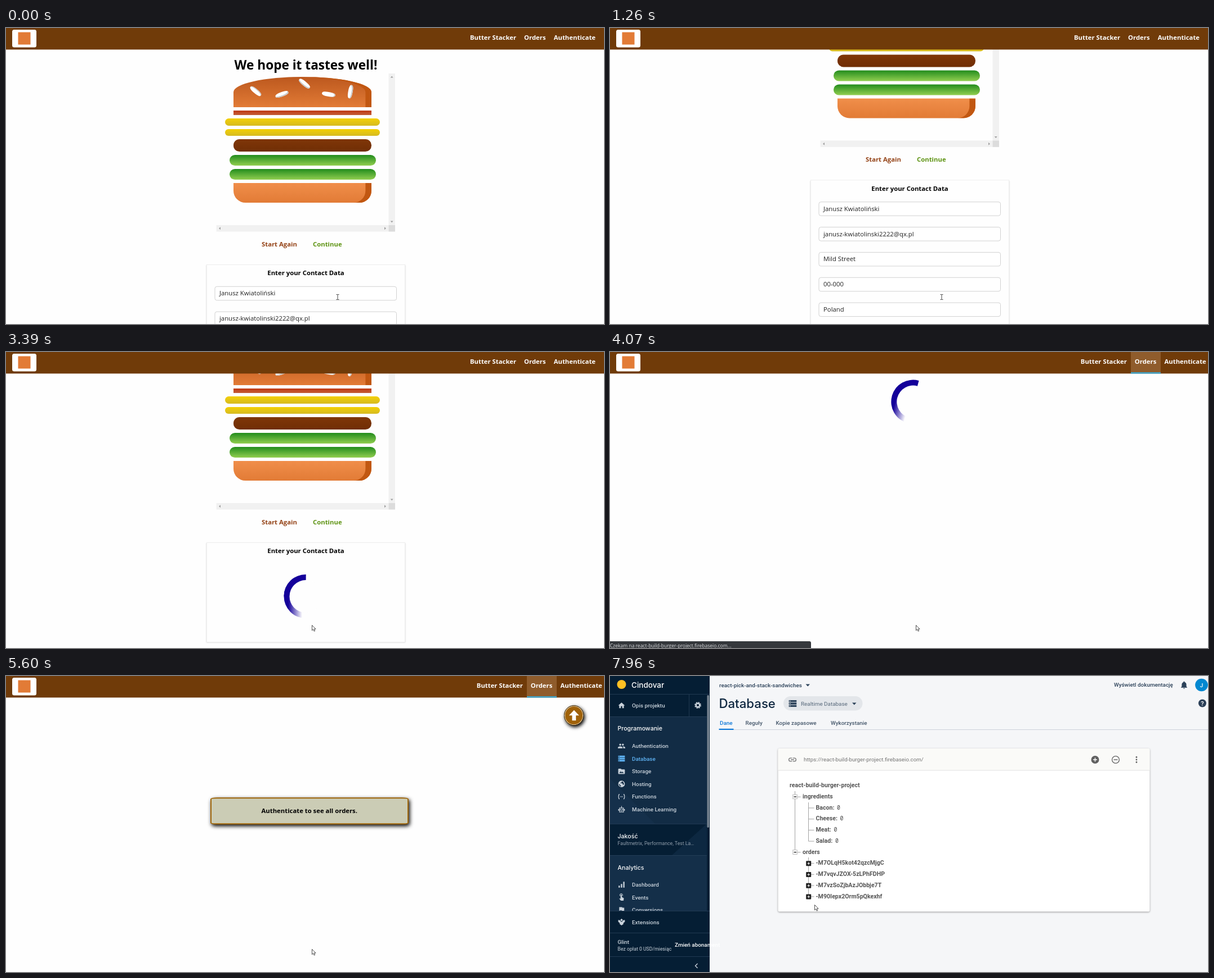
An HTML page for the animation above (7.99 s loop, 1062 by 527 pixels).

```html
<!DOCTYPE html>
<html lang="en">
<head>
<meta charset="utf-8">
<title>Order flow</title>
<style>
html, body { margin: 0; width: 100%; height: 100%; overflow: hidden; background: #fefefe; }
#stage { position: relative; width: 100%; height: 100%; overflow: hidden; contain: strict; }
#stage * { position: absolute; box-sizing: border-box; }
svg { left: 0; top: 0; overflow: visible; }
#app, #page { left: 0; top: 0; width: 100%; height: 100%; }
#app text, #app { font: 11.32px "Open Sans", sans-serif; }
#app .b { font-weight: 700; }
#db text { font-family: Roboto, sans-serif; font-weight: 500; font-size: 9.9px; }
#db .g { font-family: Inter, sans-serif; }
#burger { left: 373.6px; top: 81px; width: 306px; height: 270px; }
#burger > div { position: relative; margin: 6.12px auto; }
#burger .top { border-radius: 50% 50% 0 0; }
#burger .top, #burger .bottom { box-shadow: inset -10.6px 0 #c15711; }
#burger .bottom { border-radius: 0 0 21.2px 21.2px; }
.seed, .seed::before, .seed::after { background: #fff; border-radius: 40%; position: absolute; }
.seed { width: 10%; height: 15%; top: 50%; }
.seed::before, .seed::after { content: ""; width: 100%; height: 100%; }
.s1 { left: 30%; transform: rotate(-20deg); box-shadow: inset -1.4px -2.1px #c9c9c9; }
.s1::after { left: -170%; top: -260%; transform: rotate(60deg); box-shadow: inset -.7px 1.4px #c9c9c9; }
.s1::before { left: 180%; top: -50%; transform: rotate(60deg); box-shadow: inset -.7px -2.1px #c9c9c9; }
.s2 { left: 64%; transform: rotate(10deg); box-shadow: inset -2.1px 0 #c9c9c9; }
.s2::before { left: 150%; top: -130%; transform: rotate(90deg); box-shadow: inset .7px 2.1px #c9c9c9; }
.s2::after { display: none; }
#card { left: 356px; top: 421px; width: 353px; border: .7px solid #eee; box-shadow: 0 1.4px 2.1px #ccc; }
#spin { width: 77.8px; height: 77.8px; margin: -38.9px; border-radius: 50%;
  background: linear-gradient(to right, #14009a 10%, #14009a00 42%); }
#spin::before { content: ""; position: absolute; width: 50%; height: 50%; border-radius: 100% 0 0; background: #14009a; }
#spin::after { content: ""; position: absolute; inset: 12.5%; border-radius: 50%; background: #fefefe; }
#msg { left: 362.5px; top: 0; width: 352.5px; height: 48px; border: 2.6px solid #a0660a; border-radius: 12px 12px 8px 8px / 3px;
  background: #cbccb5; box-shadow: 2px 3px 7px #000; text-align: center; line-height: 43px; font-weight: 700; }
#up { left: 990.5px; top: 0; width: 35.5px; height: 35.5px; border: 1px solid #3a2400; border-radius: 50%;
  background: #a0620a; box-shadow: inset 0 0 0 1px #f3e6cf, 2px 3px 6px #000; }
#status { left: 0; top: 514.5px; width: 356.5px; height: 13px; background: #35383c; border-radius: 0 3px 0 0;
  color: #dcdde0; font-size: 8.5px; line-height: 15px; white-space: nowrap; }
</style>
</head>
<body>
<div id="stage">
  <div id="app">
    <div id="page">
      <div id="burger"></div>
      <div id="card"></div>
      <svg id="form" width="1062" height="527"></svg>
    </div>
    <div id="spin"></div>
    <div id="msg">Authenticate to see all orders.</div>
    <div id="up"><svg width="34" height="34"><path d="M16.8 7.5l9 9.5h-5.6v9h-6.8v-9H7.8z" fill="#fff"/></svg></div>
    <svg id="nav" width="1062" height="40"></svg>
    <div id="status">Czekam na react-build-burger-project.firebaseio.com...</div>
  </div>
  <svg id="db" width="1062" height="527"></svg>
  <svg id="cursor" width="20" height="20">
    <path id="beam" d="M-2.5-4.5h2l.5.5.5-.5h2M0-4v8M-2.5 4.5h2L0 4l.5.5h2" fill="none" stroke="#333" stroke-width=".9"/>
    <path id="arrow" d="M.5.5v9.3l2.1-2 1.6 3.4 1.5-.7-1.5-3.3h2.9z" fill="#fff" stroke="#222" stroke-width=".8"/>
    <path id="hand" d="M-1 7V1q1-1.3 2 0v3.5l4.5 1q1 .4 1 1.5L6 10l-1 2.5h-5L-3.7 7.5q0-1.5 1.3-1z" fill="#fff" stroke="#222" stroke-width=".8"/>
  </svg>
</div>
<script>
const LOOP = 7990, $ = id => document.getElementById(id);
const text = (x, y, s, fill = '#000', attr = '') => `<text x="${x}" y="${y}" fill="${fill}" ${attr}>${s}</text>`;
const rect = (x, y, w, h, fill, attr = '') => `<rect x="${x}" y="${y}" width="${w}" height="${h}" fill="${fill}" ${attr}/>`;
const path = (d, fill, attr = '') => `<path d="${d}" fill="${fill}" ${attr}/>`;
const line = (d, color, w = 1) => path(d, 'none', `stroke="${color}" stroke-width="${w}"`);
const disc = (x, y, r, fill, attr = '') => `<circle cx="${x}" cy="${y}" r="${r}" fill="${fill}" ${attr}/>`;
const icon = (x, y, d, fill, s = .59) => path(d, fill, `fill-rule="evenodd" transform="translate(${x} ${y}) scale(${s}) translate(-12 -12)"`);
const BOLD = 'class="b"', MID = 'text-anchor="middle"';

// Burger: class, width %, height, radius, gradient
$('burger').innerHTML = [
  ['top', 80, 54, '', '#bc581e,#e27b36'],
  ['', 80, 8.1, 0, '#bf3813,#c45e38'],
  ['', 90, 12.15, 14, '#f4d004,#d6bb22'],
  ['', 90, 12.15, 14, '#f4d004,#d6bb22'],
  ['', 80, 21.6, 10.6, '#7f3608,#702e05'],
  ['', 85, 18.9, 14, '#228c1d,#91ce50'],
  ['', 85, 18.9, 14, '#228c1d,#91ce50'],
  ['bottom', 80, 35.1, '', '#f08e4a,#e27b36']
].map(([c, w, h, r, g]) => `<div class="${c}" style="width:${w}%;height:${h}px;background:linear-gradient(${g});${r === '' ? '' : `border-radius:${r}px`}">${
  c === 'top' ? '<div class="seed s1"></div><div class="seed s2"></div>' : ''}</div>`).join('');

const fields = ['Janusz Kwiatoliński', 'janusz-kwiatolinski2222@qx.pl', 'Mild Street', '00-000', 'Poland'];
const box = (y, h) => rect(371, y, 322.5, h, '#fff', 'rx="3.5" stroke="#ccc" stroke-width=".9"');
$('form').innerHTML =
  text(532.5, 74, 'We hope it tastes well!', '#000', `${BOLD} ${MID} style="font-size:22.64px"`) +
  rect(679.5, 81, 11.5, 270, '#f1f1f1') + rect(373.6, 351, 306, 11.5, '#f1f1f1') + rect(679.5, 351, 11.5, 11.5, '#dcdcdc') +
  path('M682.7 88.5h5l-2.5-3zM682.7 343.5h5l-2.5 3zM381 354.3v5l-3-2.5zM672 354.3v5l3-2.5z', '#a0a0a0') +
  text(454, 388.6, 'Start Again', '#944317', BOLD) + text(545, 388.6, 'Continue', '#5c9210', BOLD) +
  text(532.5, 440.2, 'Enter your Contact Data', '#000', `${BOLD} ${MID}`) +
  '<g id="fields">' + fields.map((s, i) => box(460.3 + i * 44.85, 24.5) + text(379, 476.3 + i * 44.85, s, '#222')).join('') +
  box(684.3, 26) + text(382, 701.6, 'Fastest', '#222') + line('M684.5 696.2l2.7 2.8 2.7-2.8', '#222', 1.4) +
  text(525.5, 743, 'ORDER', '#5c9210', `${BOLD} ${MID}`) + '</g>';

$('nav').innerHTML = rect(0, 0, 1062, 38.4, '#703b09') + rect(11, 3, 43, 31.5, '#fff', 'rx="3.5"') +
  rect(21.5, 7.5, 22, 22, '#e27b36') +
  '<g id="active">' + rect(925, 0, 53, 36, '#8f5c2c') + rect(925, 36, 53, 2.6, '#40a4c8') + '</g><g id="links">' +
  text(824, 21.3, 'Butter Stacker', '#fff', BOLD) + text(920, 21.3, 'Orders', '#fff', BOLD) +
  text(972.7, 21.3, 'Authenticate', '#fff', BOLD) + '</g>';

const ICONS = {
  home: 'M10 20v-6h4v6h5v-8h3L12 3 2 12h3v8z',
  people: 'M16 11a3 3 0 1 0 0-6 3 3 0 0 0 0 6zM8 11a3 3 0 1 0 0-6 3 3 0 0 0 0 6zM8 13c-2.3 0-7 1.2-7 3.5V19h14v-2.5C15 14.2 10.3 13 8 13zm8 0h-1c1.2.9 2 2 2 3.5V19h6v-2.5c0-2.3-4.7-3.5-7-3.5z',
  data: 'M2 21h20v-5H2zM2 3v5h20V3zM2 14.5h20v-5H2zM4 4.5h2v2H4zM4 11h2v2H4zM4 17.5h2v2H4z',
  folder: 'M10 4H4a2 2 0 0 0-2 2v12a2 2 0 0 0 2 2h16a2 2 0 0 0 2-2V8a2 2 0 0 0-2-2h-8zM5 17l4-5 3 3 2-2 5 4z',
  globe: 'M12 2a10 10 0 1 0 0 20 10 10 0 0 0 0-20zM4 11l6 6v3q-6-2-6-9zM13 4q7 2 6 11l-4-2v-3H9V8h3z',
  code: 'M6 4H5Q2 5 2 12t3 8h1v-2q-2-1-2-6t2-6zM18 4h1q3 1 3 8t-3 8h-1v-2q2-1 2-6t-2-6zM8 11h2v2H8zM11 11h2v2h-2zM14 11h2v2h-2z',
  robot: 'M11 2h2v5h6v4h3v5h-3v5H5v-5H2v-5h3V7h6zM7 9v10h10V9zM8 11h3v3H8zM13 11h3v3h-3zM9 16h6v1.5H9z',
  bars: 'M3 15h4v6H3zM10 10h4v11h-4zM17 3h4v18h-4z',
  touch: 'M9 12V5a2 2 0 0 1 4 0v6l6 3-1 8h-8l-5-6 1-1 3 1zM7 8a5 5 0 1 1 8 0l-1-1a3.5 3.5 0 1 0-6 0z',
  flag: 'M5 3h9l.4 2H20v10h-7l-.4-2H7v8H5z',
  puzzle: 'M12 2l4 4-4 4-4-4zM2 6h4l6 6 6-6h4v5l-5 5 1 2-6 4-6-4 1-2-5-5z',
  bell: 'M12 22a2 2 0 0 0 2-2h-4a2 2 0 0 0 2 2zm6-6v-5c0-3-1.6-5.6-4.5-6.3V4a1.5 1.5 0 0 0-3 0v.7C7.6 5.4 6 8 6 11v5l-2 2v1h16v-1z',
  link: 'M3.9 12A3.1 3.1 0 0 1 7 8.9h4V7H7a5 5 0 0 0 0 10h4v-1.9H7A3.1 3.1 0 0 1 3.9 12zM8 13h8v-2H8zM17 7h-4v1.9h4a3.1 3.1 0 0 1 0 6.2h-4V17h4a5 5 0 0 0 0-10z'
};

function sidebar() {
  const soft = '#c9d2db';
  const item = (y, name, s, color = soft) => icon(20.5, y, ICONS[name], color) + text(39, y + 3.5, s, color);
  const head = (y, s) => text(13.5, y, s, '#fff', 'class="g" style="font-size:10.6px"');
  const small = (y, s, color) => text(13.5, y, s, color, 'style="font-size:8.7px;font-weight:400"');
  return rect(0, 0, 177, 527, '#051e34') + rect(0, 72, 172, 191, '#122c45') + rect(0, 319, 172, 99, '#142f49') +
    path('M0 183L80 263H0z', '#1b3953', 'opacity=".4"') + path('M172 263v56H110z', '#0d2841') +
    disc(20.5, 15, 8, '#ffc023') + text(38, 21, 'Cindovar', '#fff', 'class="g" style="font-size:13.5px"') +
    item(52.5, 'home', 'Opis projektu') +
    disc(156, 52, 3.3, 'none', `stroke="${soft}" stroke-width="2.4"`) +
    disc(156, 52, 5.1, 'none', `stroke="${soft}" stroke-width="1.6" stroke-dasharray="2.4 1.6"`) +
    head(97, 'Programowanie') +
    item(124.7, 'people', 'Authentication') + item(147, 'data', 'Database', '#5fb4f5') + item(169.7, 'folder', 'Storage') +
    item(192.2, 'globe', 'Hosting') + item(214.8, 'code', 'Functions') + item(237.5, 'robot', 'Machine Learning') +
    head(288.5, 'Jakość') + small(301, 'Faultmetrix, Performance, Test La…', '#8f9dab') + head(344.5, 'Analytics') +
    item(371.5, 'bars', 'Dashboard') + item(394.2, 'touch', 'Events') + item(416.7, 'flag', 'Conversions') +
    rect(0, 418, 177, 109, '#051e34') + item(438, 'puzzle', 'Extensions') +
    text(13.5, 477, 'Glint', soft) + small(488.5, 'Bez opłat 0 USD/miesiąc', soft) +
    text(115, 482, 'Zmień abonament', '#fff') + line('M155.5 512l-4 4 4 4', soft, 1.4) +
    line('M0 32.5h177M140.5 33v39M0 72.5h172M0 263.5h172M0 319.5h172M0 418.5h177M0 457.5h177M0 499.5h177', '#27405a', .8) +
    rect(172.5, 34, 3.5, 236, '#7b8793', 'rx="1.7"');
}

function tree() {
  const row = i => 194.5 + i * 19.73;
  const label = (x, i, s) => text(x, row(i) + 3.7, s, '#555', 'style="font-size:10.6px;font-weight:700"');
  const square = (x, i, open) => open
    ? rect(x - 3.7, row(i) - 3, 7.5, 7.5, '#fff', 'stroke="#aaa" stroke-width=".8"') + line(`M${x - 2} ${row(i) + .8}h4.5`, '#222', 1.4)
    : rect(x - 4.3, row(i) - 3.3, 9, 9, '#222', 'rx="1"') + line(`M${x - 2} ${row(i) + 1.2}h4.5m-2.25-2.25v4.5`, '#fff', 1.1);
  const twig = (x, i) => line(`M${x} ${row(i) + 1}h10`, '#999', .9);
  const food = ['Bacon', 'Cheese', 'Meat', 'Salad'], zero = [403, 408.5, 397.5, 400];
  const orders = ['-M7OLqH5kot42qzcMjgC', '-M7vqvJZOX-5zLPhFDHP', '-M7vzSoZjbAzJObbje7T', '-M90Iepx2Orm5pQkexhf'];
  return '<g id="flash">' + rect(315, 185.5, 132, 17, '#ffda7b') + rect(339, 304.5, 38, 17, '#ffda7b') +
    rect(362, 383.5, 125, 17, '#a4e6a4') + '</g>' +
    line(`M328.5 205V${row(6)}M352.5 225V${row(5) + 1}M352.5 323V${row(10)}`, '#999', .9) +
    label(319, 0, 'react-build-burger-project') +
    [[1, 'ingredients'], [6, 'orders']].map(([i, s]) => twig(328.5, i) + square(328.5, i, true) + label(342, i, s)).join('') +
    food.map((s, i) => twig(352.5, i + 2) + label(365.5, i + 2, s + ':') +
      text(zero[i], row(i + 2) + 3.7, '0', '#444', `style="font:9.9px 'Noto Sans Mono',monospace"`)).join('') +
    orders.map((s, i) => twig(352.5, i + 7) + square(352.5, i + 7) + label(365.5, i + 7, s)).join('');
}

const navy = '#2b4159', slate = '#44566a', gray = '#616161';
$('db').innerHTML = rect(0, 0, 1062, 527, '#f5f6f8') + sidebar() +
  text(194, 19.7, 'react-pick-and-stack-sandwiches', navy) + path('M347.5 14.5h7.5l-3.75 4z', navy) +
  text(895, 19.3, 'Wyświetl dokumentację', navy) + icon(1019.5, 16, ICONS.bell, navy, .68) +
  disc(1050.5, 16, 11.3, '#0288d1') + text(1050.5, 19.7, 'J', '#fff', MID) +
  disc(1052, 48.5, 7, '#2c4058') + text(1052, 52.5, '?', '#fff', MID + ' style="font-size:11px"') +
  text(193.5, 57, 'Database', '#0f2740', 'class="g" style="font-size:22.2px"') +
  rect(308, 36, 140.5, 25.5, '#e3e6ea', 'rx="12.75"') + icon(324.5, 49, ICONS.data, navy, .68) +
  text(339, 52.5, 'Realtime Database', '#57687a', 'style="font-weight:400"') + path('M430 47.5h7.5l-3.75 4z', navy) +
  [[195, 'Dane', '#0c78d8'], [240.5, 'Reguły', slate], [294.5, 'Kopie zapasowe', slate], [392, 'Wykorzystanie', slate]]
    .map(([x, s, c]) => text(x, 87, s, c)).join('') +
  line('M194 95.5h868', '#c8cfd7', .9) + rect(193.5, 93.8, 26, 2.2, '#0c78d8') +
  rect(298.5, 129, 660, 290.5, '#fff', 'rx="2.8" style="filter:drop-shadow(0 1px 1.5px #0006)"') +
  path('M298.5 168v-36q0-3 3-3h654q3 0 3 3v36z', '#fafaf8') + line('M298.5 168h660', '#dedede', .9) +
  icon(324, 149, ICONS.link, '#757575', .7) +
  text(344, 152.3, 'https://react-build-burger-project.firebaseio.com/', '#757575', 'style="font-weight:400;font-size:9.8px"') +
  disc(861.5, 149, 7, gray) + line('M858 149h7M861.5 145.5v7', '#fff', 1.4) +
  disc(898, 149, 6.4, 'none', `stroke="${gray}" stroke-width="1.3"`) + line('M894.5 149h7', gray, 1.4) +
  [144.5, 149, 153.5].map(y => disc(935, y, 1.4, gray)).join('') + tree();

const PRESS = 3390, ORDERS = 4012, LOADED = 4400, CONSOLE = 5670;
const clamp = (t, a, b) => Math.min(1, Math.max(0, (t - a) / (b - a)));
const smooth = u => u * u * (3 - 2 * u);
const show = (id, on) => { $(id).style.display = on ? '' : 'none'; };
const move = (id, x, y, extra = '') => { $(id).style.transform = `translate(${x}px,${y}px)${extra}`; };

// Pointer moves: start, end, dx, dy
const MOVES = [[2190, 2830, -44.5, 8], [6860, 7090, -89, -29.5], [7310, 7960, -91, -49.5]];
function pointer(t) {
  if (t < 1700) return [589, 479];
  return MOVES.reduce(([x, y], [a, b, dx, dy]) => {
    const u = smooth(clamp(t, a, b));
    return [x + dx * u, y + dy * u];
  }, [587.5, 478]);
}

function draw(now) {
  const t = now % LOOP;
  const inApp = t < CONSOLE, onOrders = t >= ORDERS, sending = t >= PRESS && !onOrders, loaded = t >= LOADED;
  show('app', inApp);
  show('db', !inApp);

  show('page', !onOrders);
  show('fields', !sending);
  $('card').style.height = sending ? '178px' : '347.7px';
  move('page', 0, sending ? -82 : -251.7 * (1 - (1 - clamp(t, 1030, 1540)) ** 1.512));

  show('active', onOrders);
  $('links').setAttribute('transform', `translate(${onOrders ? 11.8 : 0} 0)`);

  show('spin', sending || onOrders && !loaded);
  const turn = (t - (sending ? PRESS : ORDERS)) / 1400 * 360;
  move('spin', sending ? 532.5 : 538.4, sending ? 435 : 88.6, ` rotate(${turn}deg)`);

  show('status', t >= 4040 && !loaded);
  show('msg', loaded);
  show('up', loaded);
  const left = (1 - clamp(t, 4350, 5650)) ** 2;
  move('msg', 0, 216.3 - 40 * left);
  move('up', 0, 52.1 + 46 * left);

  $('flash').style.opacity = t < 6010 ? 1 : t < 6050 ? .5 : 0;

  const [x, y] = pointer(t), hand = t > 2700 && t < PRESS;
  move('cursor', x, y);
  show('beam', t < 1700);
  show('hand', hand);
  show('arrow', t >= 1700 && !hand);
}

(function tick() {
  draw(performance.now());
  requestAnimationFrame(tick);
})();
</script>
</body>
</html>
```
